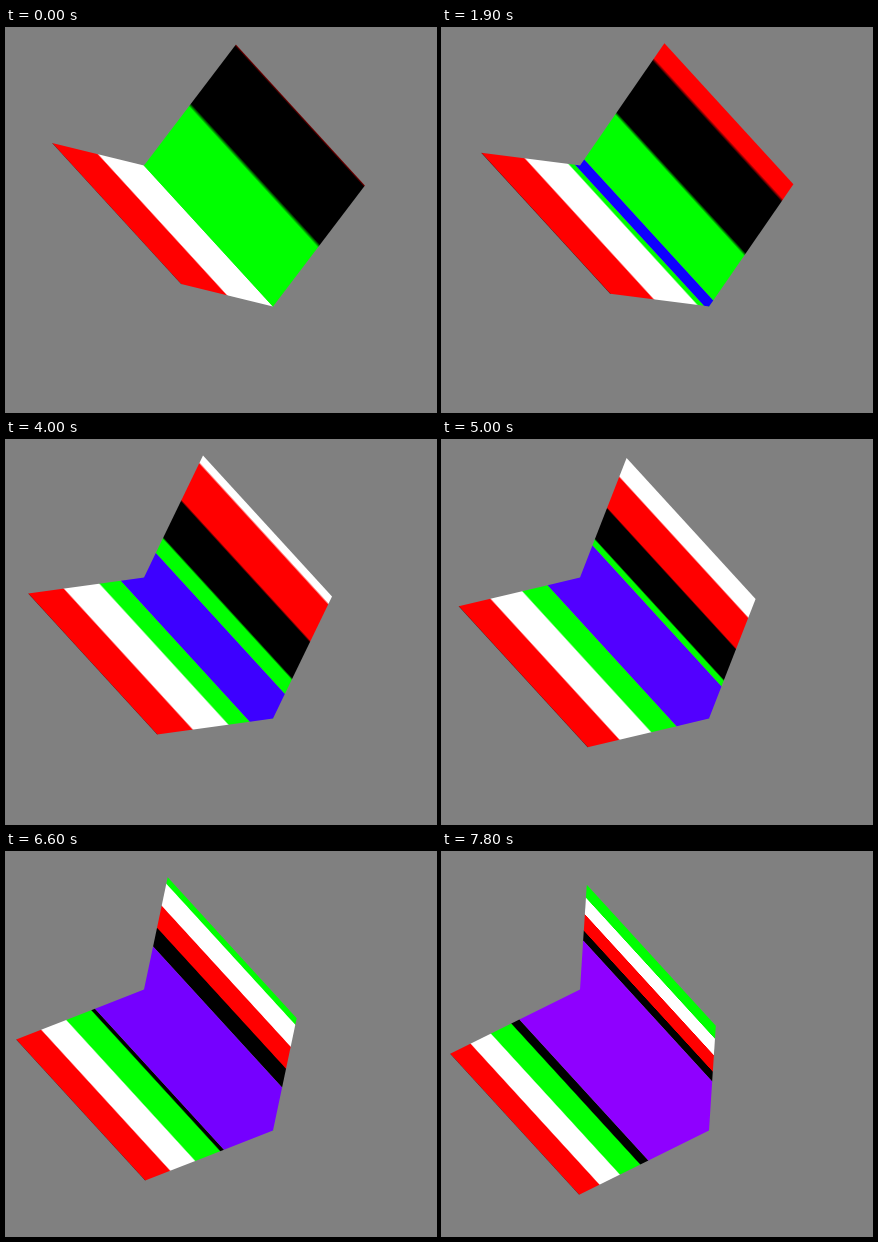
Write an HTML page with a canvas that moves like this. It is 430x384 px and loops after 8000 ms.

```html
<!DOCTYPE html>
<html lang="en">
<head>
<meta charset="utf-8">
<title>Folding stripes</title>
<style>
html, body { margin: 0; height: 100%; overflow: hidden; background: #808080; }
canvas { display: block; }
</style>
</head>
<body>
<canvas width="430" height="384"></canvas>
<script>
const ctx = document.querySelector('canvas').getContext('2d');
const COLORS = ['#0f0', '#000', '#f00', '#fff'];
const FOLD = [138, 137.5], AXIS = [129, 141];
const LOOP = 8000, HOLD = 1400, TICK = 100, TICKS_PER_STEP = 2.38;
const SOFT = 0.025; // half width of the blend between stripes
const SPAN = 6;

// Steps fall on a 100 ms grid, 200 or 300 ms apart.
function stepAt(t) {
  const tick = Math.floor((t - HOLD) / TICK);
  return Math.max(0, Math.ceil((tick + 0.48) / TICKS_PER_STEP));
}

// Unit square: x runs from the fold to the outer edge, y along the fold.
function useWall([x, y]) {
  ctx.setTransform(x, y, ...AXIS, ...FOLD);
}

// place(s) gives the x at which stripe number s begins.
function stripes(wall, band, place) {
  useWall(wall);
  const g = ctx.createLinearGradient(place(0), 0, place(SPAN), 0);
  for (let i = 0; i < SPAN; i++) {
    const color = COLORS[i % 4];
    g.addColorStop((i + SOFT) / SPAN, color);
    g.addColorStop((i + 1 - SOFT) / SPAN, color);
  }
  ctx.fillStyle = g;
  ctx.fillRect(band, 0, 1 - band, 1);
}

function drawFold() {
  ctx.setTransform(1, 0, 0, 1, ...FOLD);
  ctx.strokeStyle = COLORS[0];
  ctx.beginPath();
  ctx.moveTo(0, 0);
  ctx.lineTo(...AXIS);
  ctx.stroke();
}

function drawBand(left, right, band, color) {
  const [ax, ay] = AXIS;
  const [lx, ly] = left.map(v => v * band);
  const [rx, ry] = right.map(v => v * band);
  ctx.setTransform(1, 0, 0, 1, ...FOLD);
  ctx.fillStyle = color;
  ctx.beginPath();
  ctx.moveTo(0, 0);
  ctx.lineTo(lx, ly);
  ctx.lineTo(lx + ax, ly + ay);
  ctx.lineTo(ax, ay);
  ctx.lineTo(rx + ax, ry + ay);
  ctx.lineTo(rx, ry);
  ctx.fill();
}

function draw(t) {
  const k = stepAt(t);
  const rad = Math.PI / 180;
  const a = (45 - 1.5 * k) * rad, b = 34.5 * rad - a;
  const left = [-130 * Math.cos(a), 123 * Math.sin(b)];
  const right = [130 * Math.sin(a), -123 * Math.cos(b)];
  const band = k / 60, shift = k / 20;
  const width = (1 - band) / (2 + shift);

  ctx.resetTransform();
  ctx.fillStyle = '#808080';
  ctx.fillRect(0, 0, 430, 384);
  drawFold();
  stripes(left, band, s => 1 - (s - 2) * width);
  stripes(right, band, s => band + (s - shift) * width);
  if (k) drawBand(left, right, band, `rgb(${Math.round(5.1 * k)}, 0, 255)`);
}

function frame() {
  draw(performance.now() % LOOP);
  requestAnimationFrame(frame);
}
frame();
</script>
</body>
</html>
```
